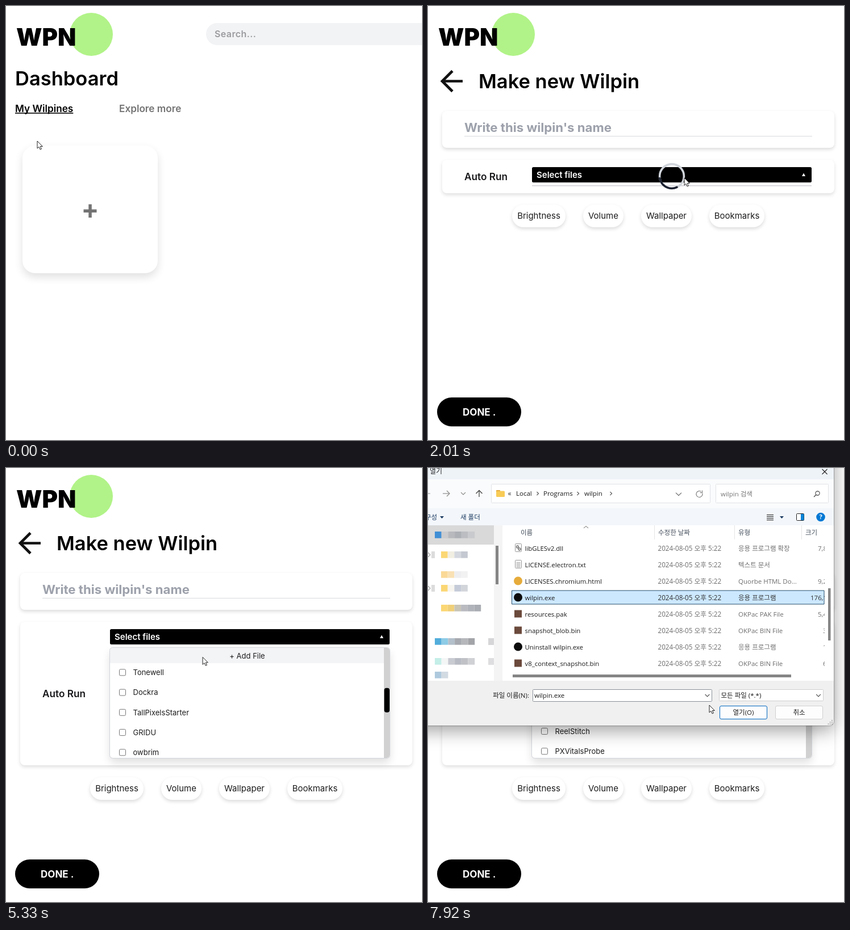
These frames come from a looping animation (732x765 px, 7.99 s). An HTML page with a canvas:

```html
<!DOCTYPE html>
<html lang="en">
<head>
<meta charset="utf-8">
<title>Dashboard</title>
<style>
html, body { margin: 0; width: 100%; height: 100%; overflow: hidden; background: #fff; }
canvas { display: block; width: 732px; height: 765px; }
</style>
</head>
<body>
<canvas id="stage"></canvas>
<script>
const W = 732, H = 765, LOOP = 7990;
const canvas = document.getElementById('stage');
const c = canvas.getContext('2d');
const dpr = window.devicePixelRatio || 1;
canvas.width = W * dpr;
canvas.height = H * dpr;

const UI = 'Inter, sans-serif';
const SYS = '"Open Sans", "Noto Sans CJK KR", "Noto Sans CJK", sans-serif';

// Times of the hard changes
const PAGE = 260, PICK = 550, LOAD = 1550, OPEN = 2980, DIALOG = 6430, SELECT = 7080;

const cursorPath = [
  [0, 55, 238], [70, 55, 238], [210, 110, 300], [280, 125, 305], [540, 470, 287],
  [1550, 470, 287], [1950, 451, 303], [3440, 451, 303], [3900, 358, 352],
  [4250, 358, 352], [4600, 355, 347], [5060, 355, 347], [5660, 334, 315],
  [5800, 334, 315], [6000, 350, 326], [6150, 350, 326], [6280, 347, 346],
  [6460, 347, 346], [6880, 233, 214], [6960, 233, 214], [7050, 226, 222],
  [7180, 226, 222], [7710, 474, 393], [7780, 477, 397], [7920, 495, 418]
];
const scrollPath = [
  [3880, 0], [4050, 97], [4720, 97], [4880, 195], [5060, 195], [5200, 293], [5280, 293], [5430, 391]
];
const apps = [
  'Bramlo', 'NoteFern', 'PulseKit', 'FarCrate', 'GlintVZ', 'Sketchillor', 'FolioNib',
  'Krelo Video Wrapper', 'Mistpad', 'Tonewell', 'Dockra', 'TallPixelsStarter', 'GRIDU',
  'owbrim', 'ReelStitch', 'PXVitalsProbe', 'Quillex', 'Rundle', 'Sorvo', 'Tindra',
  'Umberly', 'Vexlo', 'Wrenbox', 'Zellit'
];
const pills = [['Brightness', 94], ['Volume', 71], ['Wallpaper', 89], ['Auto Run', 86], ['Bookmarks', 97]];
const PILL_GAP = 31;
const files = [
  ['libGLESv2.dll', '응용 프로그램 확장', '7,8', 'dll'],
  ['LICENSE.electron.txt', '텍스트 문서', '', 'txt'],
  ['LICENSES.chromium.html', 'Quorbe HTML Do...', '9,2', 'web'],
  ['wilpin.exe', '응용 프로그램', '176,1', 'app'],
  ['resources.pak', 'OKPac PAK File', '5,4', 'pak'],
  ['snapshot_blob.bin', 'OKPac BIN File', '3', 'pak'],
  ['Uninstall wilpin.exe', '응용 프로그램', '1', 'app'],
  ['v8_context_snapshot.bin', 'OKPac BIN File', '6', 'pak']
];
const mosaic = [
  [112, 12, '#418fd5 #cbcbcd #b8b9bd #adb0b5 #bbbdc2 #c9cacd'],
  [147, 23, '#fbd774 #f1eee2 #d5d8de #c4c8d0'],
  [182, 23, '#fad997 #f9e1b4 #eeeef0 #f2f2f2'],
  [206, 23, '#fbd774 #f7f5ef #c5cbd8 #d2d5da'],
  [241, 23, '#fbd774 #efcf78 #c8c4b6 #b9bbc0 #b1b3ba #a9acb2'],
  [300, 12, '#53addb #8dcbe6 #b3bfca #a6a9af #b5b7ba #a2a4a8'],
  [335, 12, '#c4eee8 #f4f6f6 #c9cbd2 #b8bbc3 #bfc1c7 #cfd1d4'],
  [359, 12, '#aec9dd #d2dae2']
];
const handShape = new Path2D('M-1.6 1Q0-1 1.6 1V6Q3 5 4 6.5Q5.6 5.6 6.2 7.2Q8 6.7 8 8.5V12Q8 15 6.5 17.5H-.5Q-2 15-5 11Q-5.3 9-3.5 9.3L-1.6 11Z');
const arrowShape = new Path2D('M0 0V13L3 10.3L5.2 15L7.4 14L5.3 9.5H9.3Z');

const clamp = v => Math.max(0, Math.min(1, v));
const ease = v => v * v * (3 - 2 * v);
const ramp = (t, a, b) => ease(clamp((t - a) / (b - a)));

function track(keys, t) {
  let i = 0;
  while (i < keys.length - 1 && keys[i + 1][0] <= t) i++;
  const a = keys[i], b = keys[i + 1] || a;
  const p = a === b ? 0 : ramp(t, a[0], b[0]);
  return a.slice(1).map((v, k) => v + (b[k + 1] - v) * p);
}

// y is the middle of the capitals
function text(s, x, y, size, weight, color, font = UI, align = 'left') {
  c.font = `${weight} ${size}px ${font}`;
  c.fillStyle = color;
  c.textAlign = align;
  c.fillText(s, x, y + size * 0.362);
}
const sys = (s, x, y, color = '#1b1b1b', size = 11.5, align = 'left') => text(s, x, y, size, 400, color, SYS, align);

function rect(x, y, w, h, color) {
  c.fillStyle = color;
  c.fillRect(x, y, w, h);
}

function box(x, y, w, h, r, fill, stroke) {
  c.beginPath();
  c.roundRect(x, y, w, h, r);
  if (fill) { c.fillStyle = fill; c.fill(); }
  if (stroke) { c.strokeStyle = stroke; c.lineWidth = 1; c.stroke(); }
}

function raised(x, y, w, h, r, dy, blur, alpha) {
  c.save();
  c.shadowColor = `rgba(0,0,0,${alpha})`;
  c.shadowOffsetY = dy * dpr;
  c.shadowBlur = blur * dpr;
  box(x, y, w, h, r, '#fff');
  c.restore();
}

function line(points, color, width = 1) {
  c.beginPath();
  for (let i = 0; i < points.length; i += 2) c.lineTo(points[i], points[i + 1]);
  c.strokeStyle = color;
  c.lineWidth = width;
  c.stroke();
}

function poly(points, color) {
  c.beginPath();
  for (let i = 0; i < points.length; i += 2) c.lineTo(points[i], points[i + 1]);
  c.fillStyle = color;
  c.fill();
}

function disc(x, y, r, color) {
  c.beginPath();
  c.arc(x, y, r, 0, 7);
  c.fillStyle = color;
  c.fill();
}

const chevron = (x, y, w, h, color) => line([x - w, y - h, x, y + h, x + w, y - h], color, 1.1);
const chevronRight = (x, y, color) => line([x - 1.5, y - 3, x + 1.5, y, x - 1.5, y + 3], color, 1.1);

function brand() {
  disc(150, 50, 38, '#b1f388');
  text('WPN', 18, 54.5, 42, 900, '#000');
}

function dashboard() {
  box(352, 30, 420, 39, 19.5, '#f2f3f5');
  c.letterSpacing = '0.4px';
  text('Search...', 367, 49.5, 16, 600, '#9b9b9f');
  c.letterSpacing = '0px';
  text('Dashboard', 16, 128, 34.5, 600, '#000');
  text('My Wilpines', 16, 181, 17.2, 600, '#000');
  rect(16, 188, c.measureText('My Wilpines').width, 1.6, '#000');
  text('Explore more', 199, 181, 17.2, 600, '#737373');
  raised(29, 246, 238, 225, 22, 7, 15, 0.12);
  rect(136.5, 358.5, 23, 5.5, '#737373');
  rect(145.3, 349.5, 5.5, 23.5, '#737373');
}

function pillRow(t, y, list) {
  const total = list.reduce((sum, p) => sum + p[1] + PILL_GAP, -PILL_GAP);
  let x = 370 - total / 2;
  for (const [name, w] of list) {
    const fresh = name === 'Bookmarks' && t >= PICK ? 0.25 + 0.75 * ramp(t, PICK, 760) : 1;
    raised(x, y - 20, w, 40, 20, 3, 6, 0.14 * fresh);
    text(name, x + w / 2, y, 15, 400, '#1c1c1e', UI, 'center');
    x += w + PILL_GAP;
  }
}

function fileList(t, cur) {
  const scroll = track(scrollPath, t)[0];
  raised(183, 317, 492, 194, 5, 8, 15, 0.13);
  c.save();
  c.beginPath();
  c.roundRect(183, 317, 492, 194, 5);
  c.clip();
  apps.forEach((name, i) => {
    const y = 361.5 + i * 35.25 - scroll;
    if (y < 320 || y > 535) return;
    const over = t > 3440 && t < 6000 && cur[1] > 345 && Math.abs(cur[1] + 5 - y) < 17.6;
    if (over) rect(183, y - 17.6, 482, 35.2, '#f3f4f6');
    box(199.5, y - 5.5, 11, 11, 2, '#fff', '#767676');
    text(name, 223.5, y, 13, 400, '#1c1c1e');
  });
  const lit = t > 5470 && t < DIALOG;
  rect(183, 317, 482, 27, lit ? '#000' : '#f3f4f6');
  text('+ Add File', 424.5, 331, 13, 400, lit ? '#fff' : '#1c1c1e', UI, 'center');
  rect(665, 317, 10, 194, '#d1d1d1');
  box(665.5, 316.6 + scroll / 4.48, 9.5, 43, 4, '#000');
  c.restore();
  box(182.5, 316.5, 493, 195, 5, null, '#d3d5da');
}

function spinner(t) {
  const mid = (118 + (t - 2010) * 0.36) * Math.PI / 180;
  c.lineWidth = 3.6;
  c.lineCap = 'round';
  c.strokeStyle = '#d1d5db';
  c.beginPath();
  c.arc(429, 300, 21.4, 0, 7);
  c.stroke();
  c.strokeStyle = '#1b2130';
  c.beginPath();
  c.arc(429, 300, 21.4, mid - 0.92, mid + 0.92);
  c.stroke();
  c.lineCap = 'butt';
}

function autoRun(t, cur) {
  const h = t < LOAD ? 54 : t < OPEN ? 59 : 253;
  c.save();
  c.globalAlpha = ramp(t, 560, 1080);
  raised(25, 271, 690, h, 8, 3, 6, 0.13);
  text('Auto Run', 64, 271 + h / 2, 17.2, 600, '#18181b');
  box(183, 284, 492, 27, 2.5, '#000');
  text('Select files', 191, 297.5, 15, 600, '#fff');
  poly([658, 300, 661, 294.5, 664, 300], '#fff');
  if (t >= OPEN) fileList(t, cur);
  else if (t >= LOAD) {
    rect(183, 316, 492, 1.5, '#cfcfd6');
    spinner(t);
  }
  c.restore();
}

function editor(t, cur) {
  line([43, 114.5, 25, 132.5, 43, 150.5], '#111', 4.7);
  line([25, 132.5, 61, 132.5], '#111', 4.7);
  text('Make new Wilpin', 89, 133, 34.5, 600, '#000');
  raised(25, 185, 690, 65, 8, 3, 6, 0.14);
  text("Write this wilpin's name", 64, 214, 22.2, 700, '#9da1ab');
  rect(64, 229, 612, 1, '#d8dade');
  if (t < PICK) pillRow(t, 291, pills);
  else {
    autoRun(t, cur);
    pillRow(t, t < LOAD ? 365 : t < OPEN ? 370 : 565, pills.filter(p => p[0] !== 'Auto Run'));
  }
  box(16, 690, 148, 51, 25.5, '#000');
  text('DONE .', 61, 715.5, 17, 700, '#fff');
}

function fileIcon(kind, y) {
  if (kind === 'web') disc(158.5, y, 7.5, '#e6ab3a');
  else if (kind === 'app') disc(158.5, y, 7.5, '#0c0c0c');
  else if (kind === 'pak') rect(152, y - 6.5, 13, 13, '#6b4a3c');
  else {
    box(153.5, y - 7.5, 11, 14, 1, '#fafafa', '#9a9a9a');
    if (kind === 'txt') for (let k = -4; k < 5; k += 2) rect(155.5, y + k, 7, 0.8, '#9a9a9a');
    else {
      c.lineWidth = 1.5;
      c.strokeStyle = '#777';
      for (const [x, d] of [[157.5, -2], [161, 2]]) {
        c.beginPath();
        c.arc(x, y + d, 1.9, 0, 7);
        c.stroke();
      }
    }
  }
}

function toolbar() {
  rect(0, 0, 714, 20, '#eef3f8');
  rect(0, 20, 714, 51, '#fafbfc');
  rect(0, 71, 714, 30, '#f3f7fb');
  sys('열기', 3, 6, '#222', 12);
  line([693.5, 2, 702.5, 11], '#222', 1.1);
  line([702.5, 2, 693.5, 11], '#222', 1.1);
  line([-8, 45, 4, 45], '#a5a5a5', 1.2);
  line([26, 45, 38, 45], '#8a8a8a', 1.2);
  line([33, 40, 38, 45, 33, 50], '#8a8a8a', 1.2);
  chevron(62, 45, 4, 2, '#8a8a8a');
  line([90, 51, 90, 39.5], '#444', 1.3);
  line([84.5, 45, 90, 39.5, 95.5, 45], '#444', 1.3);
  box(111.5, 28.5, 385, 33, 1, '#fff', '#dfe2e6');
  box(506.5, 28.5, 198, 33, 1, '#fff', '#dfe2e6');
  box(120, 39, 7, 4, 1, '#e0a030');
  box(120, 40.5, 15, 10.5, 1.5, '#f8cb56');
  sys('«', 140.5, 45, '#333', 12);
  sys('Local', 155, 45);
  sys('Programs', 203, 45);
  sys('wilpin', 275, 45);
  for (const x of [193, 264, 322]) chevronRight(x, 45, '#555');
  chevron(441, 46, 5, 2.4, '#666');
  c.beginPath();
  c.arc(477.5, 46, 5.5, -0.3, 5.3);
  c.strokeStyle = '#777';
  c.lineWidth = 1.1;
  c.stroke();
  line([482.5, 39.5, 482.5, 43.5, 478.5, 43.5], '#777', 1.1);
  sys('wilpin 검색', 515, 46, '#757575');
  c.beginPath();
  c.arc(685.5, 44.5, 3.6, 0, 7);
  c.strokeStyle = '#444';
  c.stroke();
  line([683, 47, 679, 51], '#444', 1.3);
  sys('구성', -5, 86.5, '#17365d');
  poly([21, 85, 28, 85, 24.5, 89], '#17365d');
  sys('새 폴더', 57, 86.5, '#17365d');
  for (let y = 82; y < 93; y += 3) rect(596, y, 12, 1.2, '#333');
  poly([619, 85, 626, 85, 622.5, 89], '#17365d');
  box(648.5, 80.5, 13, 12, 1, '#fff', '#222');
  rect(656, 81, 5.5, 11, '#0a84d8');
  disc(691, 86.5, 7.8, '#0078d4');
  text('?', 691, 86.5, 11, 700, '#fff', SYS, 'center');
}

function sidePane() {
  rect(0, 101, 117, 34, '#d9d9d9');
  rect(116, 101, 15, 274, '#f4f4f4');
  for (const [y, x, colors] of mosaic)
    colors.split(' ').forEach((color, i) => rect(x + i * 11.7, y, 11.7, 11.7, color));
  rect(106, 300, 10, 12, '#d6d6d8');
  rect(106, 335, 10, 12, '#dedee0');
  for (const y of [153, 212]) {
    line([0, y - 4, 4, y, 0, y + 4], '#777');
    rect(6, y - 6, 6, 12, '#dcdcdc');
  }
  rect(119, 137, 5, 68, '#858585');
}

function fileTable(t, cur) {
  for (const x of [398, 539, 657]) rect(x, 101, 1, 25, '#e4e4e4');
  line([274, 106, 278, 102.5, 282, 106], '#666');
  sys('이름', 163, 114, '#444f5c');
  sys('수정한 날짜', 405, 114, '#444f5c');
  sys('유형', 546, 114, '#444f5c');
  sys('크기', 664, 114, '#444f5c');
  c.save();
  c.beginPath();
  c.rect(131, 101, 567, 274);
  c.clip();
  files.forEach(([name, type, size, kind], i) => {
    const y = 141.5 + i * 29;
    const picked = i === 3 && t >= SELECT;
    const over = cur[1] < 360 && Math.abs(cur[1] + 3 - y) < 14.5;
    if (picked) box(147.5, y - 12.5, 549.5, 24, 0, '#cce8ff', '#244e6b');
    else if (over) rect(147, y - 12.5, 551, 25, '#e5f3ff');
    fileIcon(kind, y - 0.5);
    const ink = picked ? '#333' : '#6d6d6d';
    sys(name, 170.5, y, '#1b1b1b', 11.4);
    sys('2024-08-05 오후 5:22', 404.5, y, ink, 11.7);
    sys(type, 546, y, ink);
    sys(size, size.length > 3 ? 673 : size.length > 1 ? 686 : 695, y, ink);
  });
  c.restore();
  rect(704, 212, 4.5, 92, '#858585');
  rect(149, 364, 490, 5, '#858585');
}

function dialogFooter(t) {
  rect(0, 375, 714, 71, '#f0f0f0');
  sys('파일 이름(N):', 178, 401, '#1b1b1b', 11.5, 'right');
  const named = t >= SELECT;
  box(184.5, 390.5, 315, 21, 1, '#fff', named ? '#8b9299' : '#2a7ab8');
  if (named) sys('wilpin.exe', 187, 401);
  else rect(187, 393, 1, 16, '#000');
  box(512.5, 390.5, 183, 20, 1, '#fff', '#cfcfcf');
  sys('모든 파일 (*.*)', 515.5, 401);
  chevron(491.5, 401, 3.8, 2, '#555');
  chevron(687, 401, 3.8, 2, '#555');
  box(513.5, 419.5, 83, 23, 2.5, '#fdfdfd', '#0067c0');
  box(611.5, 419.5, 83, 23, 2.5, '#fdfdfd', '#d0d0d0');
  sys('열기(O)', 555, 431, '#1b1b1b', 11.5, 'center');
  sys('취소', 653, 431, '#1b1b1b', 11.5, 'center');
  for (let i = 0; i < 3; i++)
    for (let k = 0; k <= i; k++) rect(710 - k * 3.2, 444 + i * 3.2, 1.8, 1.8, '#a9a9a9');
}

function dialog(t, cur) {
  const p = ramp(t, DIALOG, DIALOG + 150);
  const s = 0.94 + 0.06 * p;
  c.save();
  c.globalAlpha = p;
  c.translate(350, 220);
  c.scale(s, s);
  c.translate(-350, -220);
  raised(-60, -60, 774, 514, 8, 9, 32, 0.38);
  box(-60, 300, 774, 154, 8, '#f0f0f0');
  rect(0, 101, 714, 274, '#fff');
  toolbar();
  sidePane();
  fileTable(t, cur);
  dialogFooter(t);
  box(-60.5, -60.5, 775, 515, 8, null, 'rgba(0,0,0,.25)');
  c.restore();
}

function pointer(t, [x, y]) {
  const hand = t > 130 && t < 1600 || t > 5500 && t < 6200;
  const shape = hand ? handShape : arrowShape;
  c.save();
  c.translate(x, y);
  c.lineJoin = 'round';
  c.fillStyle = '#fff';
  c.fill(shape);
  c.strokeStyle = '#222';
  c.lineWidth = 1;
  c.stroke(shape);
  if (hand) for (const k of [1.6, 4, 6.2]) line([k, 6.5, k, 9.5], '#222', 0.8);
  c.restore();
}

function draw(now) {
  const t = now % LOOP;
  const cur = track(cursorPath, t);
  c.setTransform(dpr, 0, 0, dpr, 0, 0);
  rect(0, 0, W, H, '#fff');
  brand();
  if (t < PAGE) dashboard();
  else editor(t, cur);
  if (t >= DIALOG) dialog(t, cur);
  pointer(t, cur);
}

let start;
function tick(now) {
  start ??= now;
  draw(Math.max(0, now - start));
  requestAnimationFrame(tick);
}
requestAnimationFrame(tick);
</script>
</body>
</html>
```
